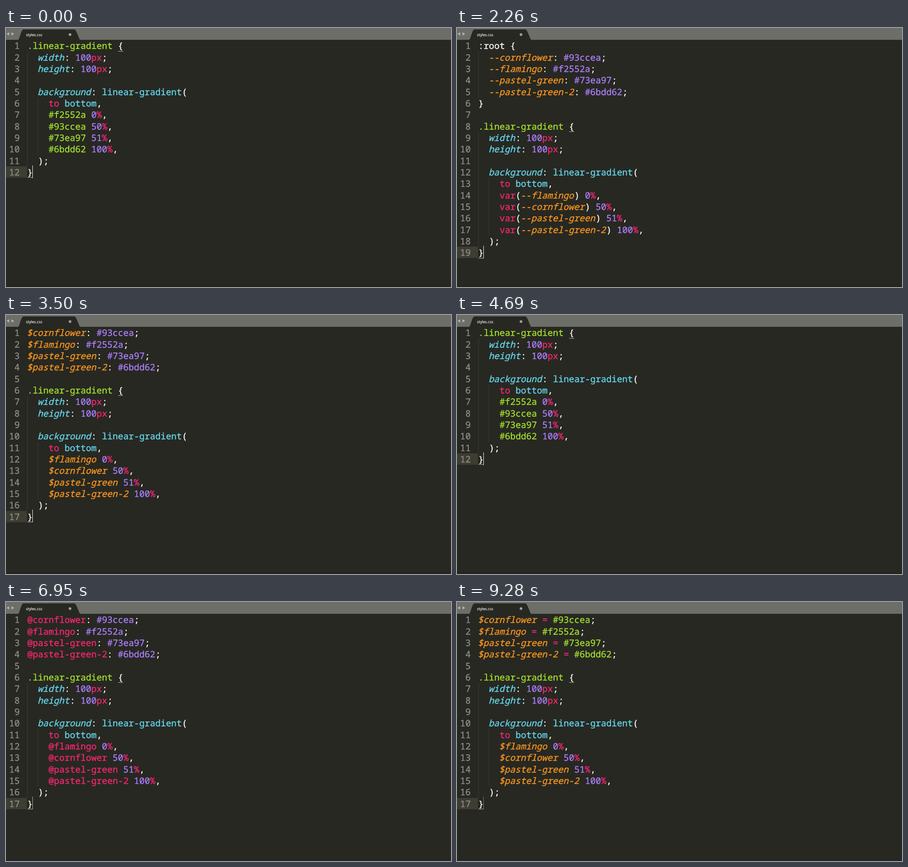
Recreate the animation shown at these times as an HTML page. Size 980 by 571 pixels, loop 9.34 s.

```html
<!DOCTYPE html>
<html lang="en">
<head>
<meta charset="utf-8">
<title>styles.css</title>
<style>
  html, body { margin: 0; width: 100%; height: 100%; overflow: hidden; background: #272822; }
  svg { display: block; }
  text { white-space: pre; text-rendering: geometricPrecision; fill: currentColor; stroke: currentColor; stroke-width: .35px; }
  tspan { fill: currentColor; stroke: currentColor; }
  .code text { font: 19.57px "Noto Sans Mono", monospace; color: #fcfcf8; }
  .code .number { color: #8f908a; text-anchor: end; }
  .tab { font: 8.3px "Open Sans", sans-serif; color: #fff; stroke-width: .15px; }
  .code .green { color: #a6e22e; }
  .code .cyan { color: #66d9ef; }
  .code .purple { color: #ae81ff; }
  .code .pink { color: #f92672; }
  .code .property { color: #66d9ef; font-style: italic; }
  .code .variable { color: #fd971f; font-style: italic; }
</style>
</head>
<body>
<svg id="stage" width="980" height="571" viewBox="0 0 980 571">
  <rect width="980" height="571" fill="#272822"/>
  <rect y="567" width="980" height="4" fill="#242520"/>
  <rect width="980" height="26" fill="#6d6e68"/>
  <path d="M27 26 C31 22 33 3 39 3 H150 C155 3 158 17 163 26 Z" fill="#272822"/>
  <path d="M1 13 L7 9.5 V16.5 Z M18 13 L12 9.5 V16.5 Z" fill="#b4b5b0"/>
  <text class="tab" x="44" y="17.5">styles.css</text>
  <circle cx="141" cy="14.5" r="2.9" fill="#a0a19b"/>
</svg>
<script>
const LOOP = 9340, LINE = 25.33, TOP = 26.5, LEFT = 46.9, CHAR = 11.742;
const SLANT_SHIFT = 1;
const stage = document.getElementById('stage');

const colors = { cornflower: '#93ccea', flamingo: '#f2552a', 'pastel-green': '#73ea97', 'pastel-green-2': '#6bdd62' };
const stops = { flamingo: '0%', cornflower: '50%', 'pastel-green': '51%', 'pastel-green-2': '100%' };

const rule = format => [
  '.linear-gradient {', '  width: 100px;', '  height: 100px;', '',
  '  background: linear-gradient(', '    to bottom,',
  ...Object.entries(stops).map(([name, at]) => `    ${format(name)} ${at},`),
  '  );', '}'
];
const declare = (prefix, sign) => Object.entries(colors).map(([name, hex]) => `${prefix}${name}${sign} ${hex};`);

const documents = {
  plain: rule(name => colors[name]),
  custom: [':root {', ...declare('  --', ':'), '}', '', ...rule(name => `var(--${name})`)],
  scss: [...declare('$', ':'), '', ...rule(name => '$' + name)],
  less: [...declare('@', ':'), '', ...rule(name => '@' + name)],
  stylus: [...declare('$', ' ='), '', ...rule(name => '$' + name)]
};

const syntax = new RegExp([
  '(?<variable>(?:--|\\$)[\\w-]+)',
  '(?<green>\\.linear-gradient)',
  '(?<hex>#\\w+)',
  '(?<cyan>linear-gradient|bottom)',
  '(?<property>width|height|background)',
  '(?<pink>@[\\w-]+|var|to\\b|px|[%=])',
  '(?<purple>\\d+)',
  ':root|.'
].join('|'), 'g');

function add(parent, tag, attrs, content = '') {
  const node = document.createElementNS('http://www.w3.org/2000/svg', tag);
  for (const key in attrs) node.setAttribute(key, attrs[key]);
  node.textContent = content;
  return parent.appendChild(node);
}

const lineTop = index => TOP + index * LINE;
const box = (parent, x, y, width, height, fill) => add(parent, 'rect', { x, y, width, height, fill });

function drawLine(parent, line, index) {
  const y = lineTop(index) + 19.9;
  add(parent, 'text', { class: 'number', x: 30.3, y }, index + 1);
  const text = add(parent, 'text', { y });
  for (const match of line.matchAll(syntax)) {
    if (match[0] === ' ') continue;
    let kind = Object.keys(match.groups).find(key => match.groups[key]) || '';
    if (kind === 'hex') kind = line.includes(':') ? 'purple' : 'green';
    const slanted = kind === 'variable' || kind === 'property';
    const x = LEFT + match.index * CHAR - (slanted ? SLANT_SHIFT : 0);
    add(text, 'tspan', { class: kind, x }, match[0]);
  }
}

function drawDocument(lines) {
  const group = add(stage, 'g', { class: 'code' });
  const last = lines.length - 1;
  const start = lines.indexOf('.linear-gradient {');
  const guide = (x, from, to) => box(group, x, lineTop(from), 1, (to - from) * LINE, '#3a3b34');
  const underline = (x, index) => box(group, x, Math.round(lineTop(index) + 24.2), 11, 1, '#b9bab3');

  box(group, 0, Math.round(lineTop(last)), 46, 25, '#3e3d32');
  if (lines[0] === ':root {') guide(47, 1, 5);
  guide(47, start + 1, last);
  guide(70, start + 5, last - 1);
  lines.forEach((line, index) => drawLine(group, line, index));
  underline(247, start);
  underline(47, last);
  const caret = box(group, 58, Math.round(lineTop(last) - 2.4), 1, 28, '#f8f8f0');
  return { group, caret };
}

const views = {};
for (const name in documents) views[name] = drawDocument(documents[name]);

// Start of each document in ms
const scenes = [
  [0, 'plain'], [1160, 'custom'], [2330, 'plain'], [3420, 'scss'],
  [4690, 'plain'], [5710, 'less'], [7090, 'plain'], [8190, 'stylus']
];

// The caret fades in, stays, and fades out once per period
function caretOpacity(time) {
  const phase = (time + 275) % 1193;
  const fadeIn = .35 + phase / 220;
  const fadeOut = (755 - phase) / 150;
  return Math.max(0, Math.min(1, fadeIn, fadeOut));
}

function render(time) {
  const [, current] = scenes.findLast(([start]) => start <= time);
  for (const name in views) views[name].group.style.display = name === current ? '' : 'none';
  views[current].caret.style.opacity = caretOpacity(time);
}

const began = performance.now();
function tick() {
  render((performance.now() - began) % LOOP);
  requestAnimationFrame(tick);
}
tick();
</script>
</body>
</html>
```
